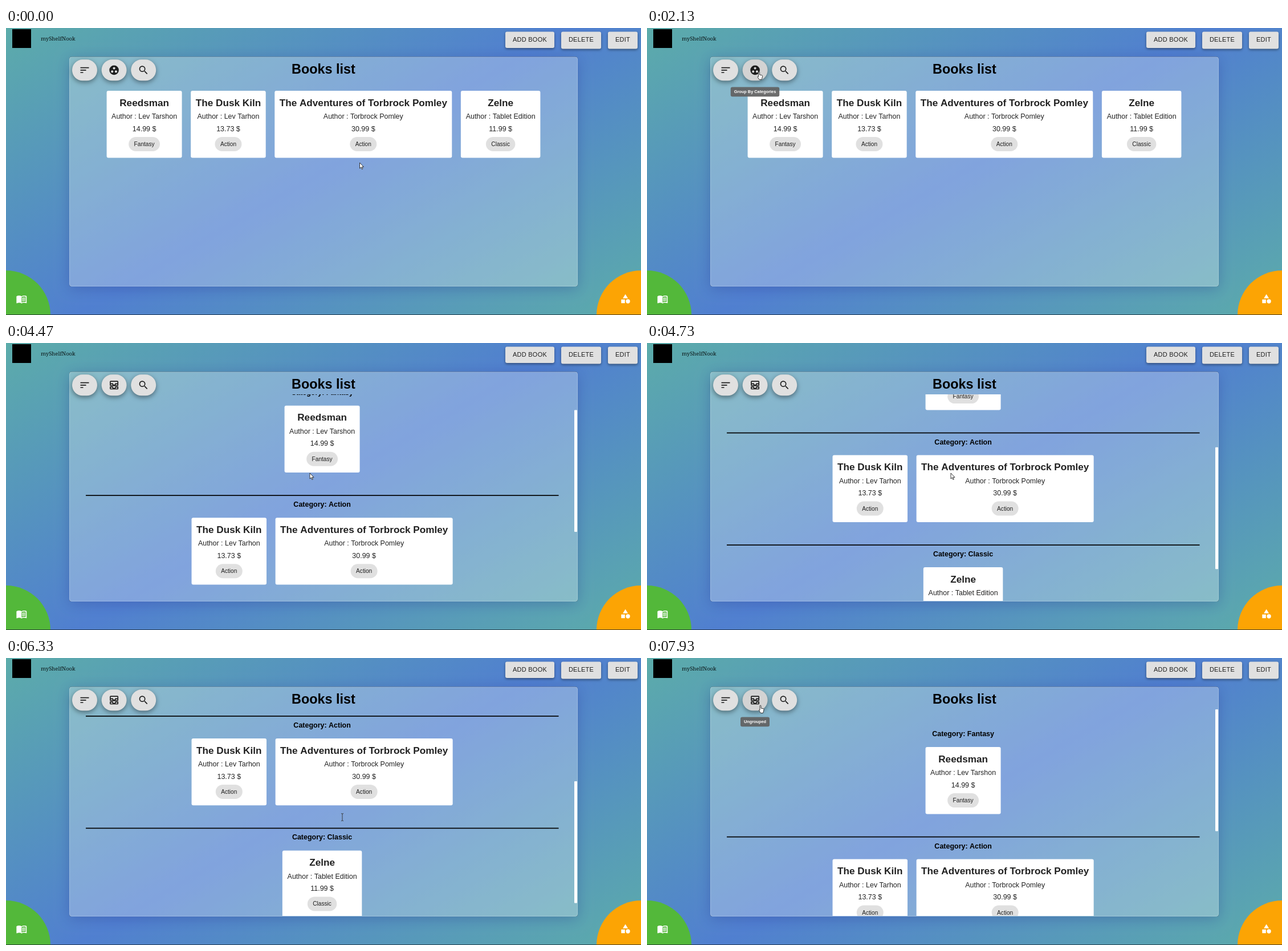
Write an HTML page with a canvas that moves like this. It is 1114 px wide and 503 px high and loops after 8 s.

```html
<!DOCTYPE html>
<html lang="en">
<head>
<meta charset="utf-8">
<title>Books list</title>
<style>
  html, body { margin: 0; width: 100%; height: 100%; overflow: hidden; }
  canvas { display: block; }
</style>
</head>
<body>
<canvas id="stage" width="1114" height="503"></canvas>
<script>
const W = 1114, H = 503, LOOP = 8000, FPS = 15;
const ctx = document.getElementById('stage').getContext('2d');
const SANS = '"Liberation Sans", Arial, sans-serif';
const SERIF = '"Noto Serif", serif';
const INK = 'rgba(0,0,0,.87)', GREY = '#e0e0e0';

const ICONS = {
  sort: 'M3 18h6v-2H3zM3 6v2h18V6zm0 7h12v-2H3z',
  inbox: 'M19 3H5c-1.1 0-2 .9-2 2v7c0 1.1.9 2 2 2h14c1.1 0 2-.9 2-2V5c0-1.1-.9-2-2-2z' +
    'M5 10h3.1c.2.8.7 1.5 1.3 2H5zm14 2h-4.4c.6-.5 1.1-1.2 1.3-2H19zm0-4h-5v1c0 1.1-.9 2-2 2s-2-.9-2-2V8H5V5h14z' +
    'M14 15v1c0 1-.9 2-2 2s-2-1-2-2v-1H3v4c0 1.1.9 2 2 2h14c1.1 0 2-.9 2-2v-4z' +
    'M5 17h3.1c.2.8.7 1.5 1.3 2H5zm14 2h-4.4c.6-.5 1.1-1.2 1.3-2H19z',
  search: 'M15.5 14h-.8l-.3-.3a6.5 6.5 0 1 0-.7.7l.3.3v.8l5 5 1.5-1.5zm-6 0a4.5 4.5 0 1 1 0-9 4.5 4.5 0 0 1 0 9z',
  book: 'M21 5c-1.1-.35-2.3-.5-3.5-.5-2 0-4 .4-5.5 1.5-1.5-1.1-3.5-1.5-5.5-1.5S2.4 4.9 1 6v14.6c0 .3.4.6.8.5' +
    'C3.1 20.4 5 20 6.5 20c2 0 4 .4 5.5 1.5 1.4-.9 3.8-1.5 5.5-1.5 1.6 0 3.3.3 4.7 1 .4.2.8-.1.8-.4V6c-.6-.4-1.2-.8-2-1z' +
    'm0 13.5c-1.1-.35-2.3-.5-3.5-.5-1.7 0-4.1.6-5.5 1.5V8c1.4-.9 3.8-1.5 5.5-1.5 1.2 0 2.4.1 3.5.5z',
  lines: 'M13 10.6q3-1.4 7-.6M13 13.3q3-1.4 7-.6M13 16q3-1.4 7-.6',
  group: 'M2 12a10 10 0 1 0 20 0a10 10 0 1 0-20 0zM5.5 15a2.5 2.5 0 1 0 5 0a2.5 2.5 0 1 0-5 0z' +
    'M9.5 8a2.5 2.5 0 1 0 5 0a2.5 2.5 0 1 0-5 0zM13.5 15a2.5 2.5 0 1 0 5 0a2.5 2.5 0 1 0-5 0z',
  shapes: 'M12 2l-5.5 9h11zM13 17.5a4.5 4.5 0 1 0 9 0a4.5 4.5 0 1 0-9 0zM3 13.5h8v8H3z',
  arrow: 'M0 0V10L2.3 7.9 3.9 11.5 5.4 10.8 3.9 7.4H7z',
  hand: 'M-1 1c0-1.3 2-1.3 2 0v4l4 .8c.9.2 1.2.8 1 1.7l-.6 3.3-.9 2.7H.5L-2.2 9.4c-.8-1.1.2-1.9 1.2-1z',
  beam: 'M-2-6.5q2 0 2 1.2 0-1.2 2-1.2M0-5.5v11M-2 6.5q2 0 2-1.2 0 1.2 2 1.2'
};
for (const name in ICONS) ICONS[name] = new Path2D(ICONS[name]);

const BOOKS = [
  { title: 'Reedsman', author: 'Lev Tarshon', price: '14.99 $', tag: 'Fantasy', w: 132 },
  { title: 'The Dusk Kiln', author: 'Lev Tarhon', price: '13.73 $', tag: 'Action', w: 131.5 },
  { title: 'The Adventures of Torbrock Pomley', author: 'Torbrock Pomley', price: '30.99 $', tag: 'Action', w: 311 },
  { title: 'Zelne', author: 'Tablet Edition', price: '11.99 $', tag: 'Classic', w: 139.5 }
];
const GAP = 15.6, SECTION = 196.5, VIEW_TOP = 90, VIEW_H = 362, MAX_SCROLL = 249.5;

// time, x, y of the pointer
const POINTER = [
  [0, 620.5, 236], [70, 620.5, 236], [900, 392, 179], [1730, 196.5, 77], [3340, 196.5, 77],
  [3470, 262, 121.5], [4200, 533, 228], [5330, 533, 228], [5470, 543, 257], [5800, 568, 284],
  [6070, 590, 279], [7030, 590, 279], [7600, 199, 83], [LOOP, 199, 83]
];

const ramp = (t, a, b) => Math.min(1, Math.max(0, (t - a) / (b - a)));
const smooth = u => u * u * (3 - 2 * u);

function pointerAt(t) {
  const i = Math.max(1, POINTER.findIndex(k => k[0] >= t));
  const a = POINTER[i - 1], b = POINTER[i], u = ramp(t, a[0], b[0]);
  return { x: a[1] + (b[1] - a[1]) * u, y: a[2] + (b[2] - a[2]) * u };
}

function scrollAt(t) {
  return 156 * smooth(ramp(t, 4316, 4733))
    + (MAX_SCROLL - 156) * smooth(ramp(t, 4880, 5133))
    - MAX_SCROLL * smooth(ramp(t, 6130, 6957));
}

// y is the middle of the capitals
function text(str, x, y, size, { bold = false, color = INK, align = 'center', font = SANS, spacing = 0 } = {}) {
  ctx.font = `${bold ? 'bold ' : ''}${size}px ${font}`;
  ctx.letterSpacing = spacing + 'px';
  ctx.textAlign = align;
  ctx.fillStyle = color;
  ctx.fillText(str, x, y + size * 0.358);
}

function box(x, y, w, h, r, color, shadow) {
  ctx.save();
  if (shadow) [ctx.shadowOffsetY, ctx.shadowBlur, ctx.shadowColor] = shadow;
  ctx.fillStyle = color;
  ctx.beginPath();
  ctx.roundRect(x, y, w, h, r);
  ctx.fill();
  ctx.restore();
}

function icon(name, x, y, size, color) {
  ctx.save();
  ctx.translate(x - size / 2, y - size / 2);
  ctx.scale(size / 24, size / 24);
  ctx.fillStyle = color;
  ctx.fill(ICONS[name], 'evenodd');
  ctx.restore();
}

function backdrop() {
  const g = ctx.createLinearGradient(309, -178.5, 805, 681.5);
  g.addColorStop(0, '#5cacaa');
  g.addColorStop(0.5, '#507fd0');
  g.addColorStop(1, '#5cacaa');
  ctx.fillStyle = g;
  ctx.fillRect(0, 0, W, H);

  ctx.save();
  ctx.beginPath();
  ctx.rect(0, 0, W, H);
  ctx.roundRect(111, 50.5, 892, 402.5, 4);
  ctx.clip('evenodd');
  box(111, 50.5, 892, 402.5, 4, '#000', [4, 24, 'rgba(31,38,135,.28)']);
  ctx.restore();
  box(111, 50.5, 892, 402.5, 4, 'rgba(255,255,255,.28)');
  ctx.strokeStyle = 'rgba(255,255,255,.2)';
  ctx.lineWidth = 1;
  ctx.beginPath();
  ctx.roundRect(111.5, 51, 891, 401.5, 4);
  ctx.stroke();
}

function header() {
  box(11, 2, 33, 33, 0, '#000');
  text('myShelfNook', 61, 19, 9.5, { align: 'left', font: SERIF });
  const shadow = [2, 4, 'rgba(0,0,0,.4)'];
  for (const [label, x, w, h] of [['ADD BOOK', 876, 86, 28.5], ['DELETE', 974, 70, 30], ['EDIT', 1056, 52, 30]]) {
    box(x, 6.5, w, h, 3, GREY, shadow);
    text(label, x + w / 2, 20.5, 10.92, { spacing: 0.3 });
  }
  text('Books list', 557, 72, 23.4, { bold: true, color: '#000' });
}

function corner(x, color) {
  ctx.fillStyle = color;
  ctx.beginPath();
  ctx.arc(x, H, 78, 0, 7);
  ctx.fill();
}

function corners() {
  corner(0, '#53b83a');
  corner(W, '#fca404');
  icon('book', 27.3, 475, 19.5, '#fff');
  ctx.save();
  ctx.translate(17.55, 465.25);
  ctx.scale(19.5 / 24, 19.5 / 24);
  ctx.strokeStyle = '#fff';
  ctx.lineWidth = 1.5;
  ctx.stroke(ICONS.lines);
  ctx.restore();
  icon('shapes', 1086.6, 474.5, 19.5, '#fff');
  ctx.fillStyle = 'rgba(25,35,45,.75)';
  ctx.fillRect(0, 502, W, 1);
}

function tools(grouped, hover) {
  const names = ['sort', grouped ? 'inbox' : 'group', 'search'];
  names.forEach((name, i) => {
    const x = 138 + i * 51.6, shade = 224 - (i === 1 ? 13 * hover : 0);
    box(x - 22, 55.3, 44, 37, 18.5, `rgb(${shade},${shade},${shade})`, [3, 8, 'rgba(0,0,0,.42)']);
    icon(name, x, 73.8, 20, INK);
  });
}

function card(book, x, y) {
  const mid = x + book.w / 2;
  box(x, y, book.w, 117.4, 3, '#fff');
  text(book.title, mid, y + 20.6, 17.16, { bold: true });
  text('Author : ' + book.author, mid, y + 44.8, 12.48);
  text(book.price, mid, y + 66.3, 12.48);
  ctx.font = `10.14px ${SANS}`;
  const w = ctx.measureText(book.tag).width + 18.8;
  box(mid - w / 2, y + 81, w, 25, 12.5, GREY);
  text(book.tag, mid, y + 93.3, 10.14);
}

function row(books, mid, y) {
  let x = mid - (books.reduce((sum, b) => sum + b.w + GAP, -GAP)) / 2;
  for (const book of books) {
    card(book, x, y);
    x += book.w + GAP;
  }
}

function groups(scroll) {
  ctx.save();
  ctx.beginPath();
  ctx.rect(112, VIEW_TOP, 890, VIEW_H);
  ctx.clip();
  ['Fantasy', 'Action', 'Classic'].forEach((tag, i) => {
    const y = 132.6 + i * SECTION - scroll;
    text('Category: ' + tag, 554.6, y, 12.48, { bold: true, color: '#000' });
    row(BOOKS.filter(b => b.tag === tag), 554.6, y + 23.5);
    if (i < 2) {
      ctx.fillStyle = '#000';
      ctx.fillRect(140, y + 180.1, 829.5, 1.7);
    }
  });
  ctx.restore();
  box(997, VIEW_TOP + scroll * 0.595, 5, 213.5, 1, '#fff');
}

function tooltip(label, w, p) {
  if (p <= 0) return;
  const s = 0.75 + 0.25 * p;
  ctx.save();
  ctx.globalAlpha = p;
  ctx.translate(189.5, 103.5);
  ctx.scale(s, s);
  box(-w / 2, 0, w, 16.8, 3, 'rgba(97,97,97,.92)');
  text(label, 0, 8, 7.35, { bold: true, color: '#fff' });
  ctx.restore();
}

function pointer({ x, y }, t) {
  const onTool = y > 55 && y < 92 && x > 168 && x < 212;
  ctx.save();
  ctx.translate(x, y);
  if (t > 6030 && t < 7080) {
    ctx.strokeStyle = '#333';
    ctx.lineWidth = 0.9;
    ctx.stroke(ICONS.beam);
  } else {
    const shape = onTool ? ICONS.hand : ICONS.arrow;
    ctx.fillStyle = '#fff';
    ctx.strokeStyle = '#222';
    ctx.lineWidth = 0.9;
    ctx.lineJoin = 'round';
    ctx.fill(shape);
    ctx.stroke(shape);
  }
  ctx.restore();
}

function draw(t) {
  const grouped = t >= 2530;
  const hover = ramp(t, 1690, 1900) - ramp(t, 3470, 3700) + ramp(t, 7530, 7780);
  const tip = smooth(ramp(t, 1790, 2030)) - smooth(ramp(t, 3470, 3670)) + smooth(ramp(t, 7630, 7860));
  backdrop();
  header();
  tools(grouped, hover);
  if (grouped) groups(scrollAt(t));
  else row(BOOKS, 557, 110);
  corners();
  if (grouped) tooltip('Ungrouped', 51, tip);
  else tooltip('Group By Categories', 85.5, tip);
  pointer(pointerAt(t), t);
}

const start = performance.now();
let last = -1;
function tick() {
  const t = (performance.now() - start) % LOOP;
  const step = Math.floor((t + 4) * FPS / 1000) % (LOOP * FPS / 1000);
  if (step !== last) {
    last = step;
    draw(step * 1000 / FPS);
  }
  requestAnimationFrame(tick);
}
tick();
</script>
</body>
</html>
```
